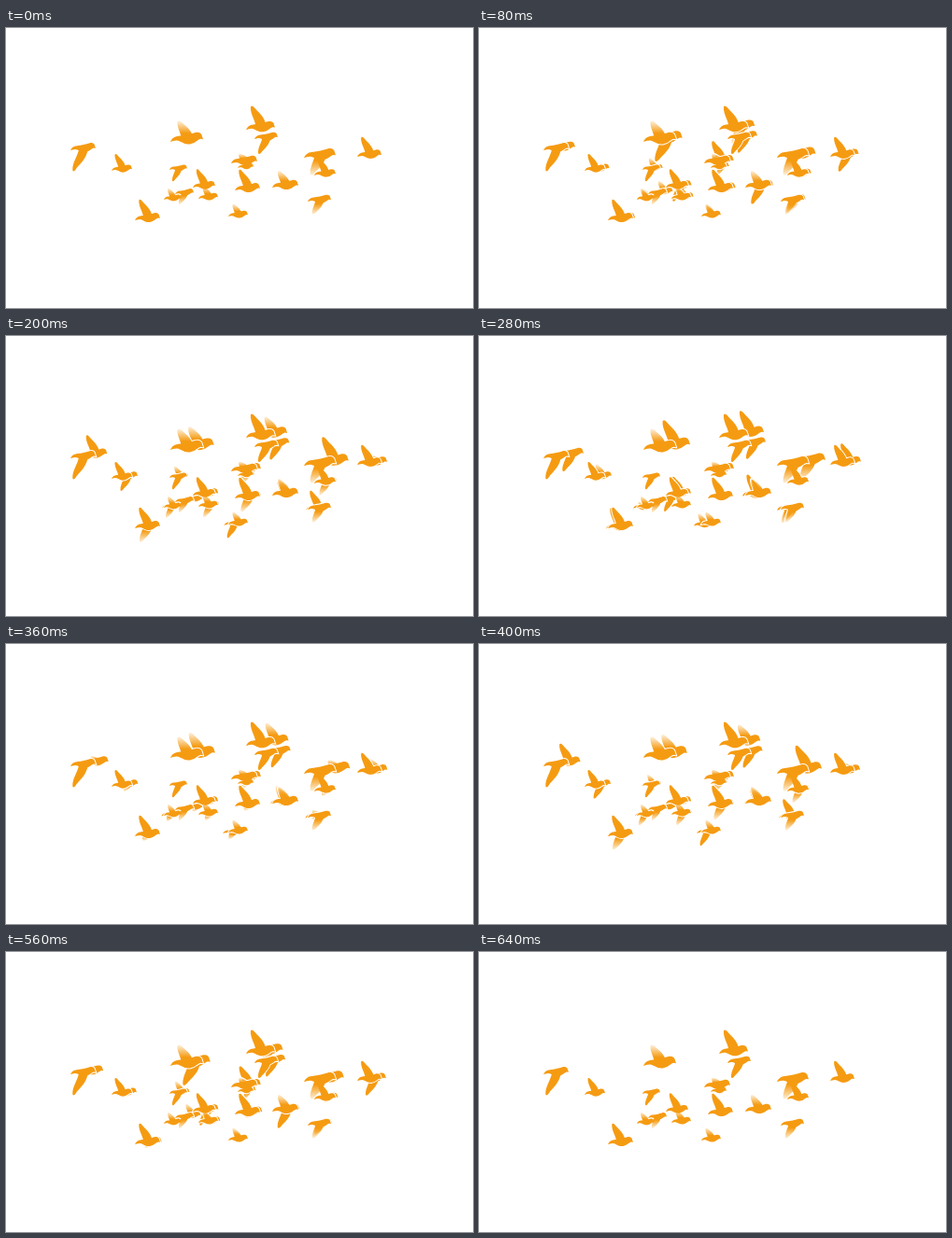
These frames come from a looping animation (500 px wide and 300 px high, 0.68 s). An HTML page:

```html
<!DOCTYPE html>
<html lang="en">
<head>
<meta charset="utf-8">
<title>Flock</title>
<style>
  html, body { margin: 0; width: 100%; height: 100%; overflow: hidden; background: #fff; }
  svg { display: block; width: 100vw; height: 100vh; }
</style>
</head>
<body>
<svg viewBox="0 0 500 300">
  <defs>
    <linearGradient id="fadeUp" x1="0" y1="1" x2="0" y2="0">
      <stop offset=".3" stop-color="#f59b12"/>
      <stop offset="1" stop-color="#f59b12" stop-opacity=".15"/>
    </linearGradient>
    <linearGradient id="fadeDown" x1="0" y1="0" x2="0" y2="1">
      <stop offset=".3" stop-color="#f59b12"/>
      <stop offset="1" stop-color="#f59b12" stop-opacity=".15"/>
    </linearGradient>
  </defs>
  <g id="moving"></g>
  <g id="halos"></g>
  <g id="resting"></g>
</svg>
<script>
const COLOR = '#f59b12';
const STEP = 40, HOLD = 80, LOOP = 680;
const PEAK = 6, LAST = 14;

// Tail x, tail y, length, furthest drift, wing poses (resting, then one per pose time).
const FLOCK = [
  [69, 131, 27, 16, 'LnuUD'],
  [113, 153, 22, 7, 'UnDDu'],
  [176, 122, 35, 15, 'uDDuU'],
  [257, 109, 31, 17, 'UduuU'],
  [266, 119, 25, 16, 'DDDDD'],
  [241, 145, 28, 4, 'vUudn'],
  [248, 150, 17, 0, 'nddvn'],
  [175, 152, 19, 0, 'DuUuD'],
  [169, 184, 19, -4, 'uuddv'],
  [181, 178, 20, 14, 'duUnD'],
  [200, 171, 24, 3, 'UDDnU'],
  [206, 183, 21, 0, 'uuddv'],
  [138, 206, 27, -2, 'UnDdU'],
  [245, 174, 27, 0, 'UnDdU'],
  [285, 171, 28, -3, 'uDDuU'],
  [238, 202, 21, -8, 'uunDu'],
  [319, 139, 34, 18, 'dnuUd'],
  [330, 158, 23, 0, 'UnDdu'],
  [323, 186, 25, -4, 'ddnUd'],
  [376, 138, 26, 7, 'UDDvU']
];
const LIFT = { U: 1, u: .78, v: .45, n: 0, d: -.85, D: -1, L: -1.3 };
const POSE_TIMES = [1, 2.9, 4, 6];

const BODY = 'M0 0C.04-.1.12-.17.25-.18C.45-.2.6-.24.74-.28' +
  'C.87-.32.96-.27.97-.17L1-.08L.92-.09C.82-.06.77.04.6.07C.42.1.32-.03.2-.04C.1-.04.06-.01 0 0Z';

function wingPath(lift) {
  const tipX = .45 - .25 * Math.abs(lift);
  const tipY = lift > 0 ? -.83 * lift : -.65 * lift;
  const point = (x, f) => `${x.toFixed(3)} ${(-.1 + (tipY + .1) * f).toFixed(3)} `;
  return 'M' + point(.34, 0) +
    'C' + point(.33, .3) + point(tipX - .06, .6) + point(tipX - .04, .95) +
    'Q' + point(tipX, 1.04) + point(tipX + .08, .92) +
    'C' + point(tipX + .2, .7) + point(.66, .5) + point(.7, 0) + 'Z';
}

function add(parent, name, attrs = {}) {
  const node = document.createElementNS('http://www.w3.org/2000/svg', name);
  for (const key in attrs) node.setAttribute(key, attrs[key]);
  return parent.appendChild(node);
}

function makeBird(parent) {
  const group = add(parent, 'g');
  const wing = add(group, 'path');
  add(group, 'path', { d: BODY, fill: COLOR });
  return { group, wing };
}

function poseBird({ group, wing }, x, y, size, lift) {
  group.setAttribute('transform', `translate(${x} ${y}) scale(${size})`);
  wing.setAttribute('d', wingPath(lift));
  const fade = lift > 0 ? 'url(#fadeUp)' : 'url(#fadeDown)';
  wing.setAttribute('fill', Math.abs(lift) < .9 ? fade : COLOR);
}

function liftAt(poses, p) {
  let i = 0;
  while (i < POSE_TIMES.length - 2 && p > POSE_TIMES[i + 1]) i++;
  const f = (p - POSE_TIMES[i]) / (POSE_TIMES[i + 1] - POSE_TIMES[i]);
  const from = LIFT[poses[i + 1]], to = LIFT[poses[i + 2]];
  return from + (to - from) * f * f * (3 - 2 * f);
}

const [moving, halos, resting] = ['moving', 'halos', 'resting']
  .map(id => document.getElementById(id));

const birds = FLOCK.map(([x, y, size, drift, poses]) => {
  const lift = LIFT[poses[0]];
  poseBird(makeBird(resting), x, y, size, lift);
  add(halos, 'path', {
    d: BODY + wingPath(lift), fill: 'none', stroke: '#fff', 'stroke-width': 2 / size,
    transform: `translate(${x} ${y}) scale(${size})`
  });
  return { x, y, size, drift, poses, parts: makeBird(moving) };
});

function render(time) {
  const t = time % LOOP;
  const step = t < HOLD ? 0 : Math.floor((t - HOLD) / STEP) + 1;
  const away = step > 0 && step <= LAST;
  moving.setAttribute('visibility', away ? 'visible' : 'hidden');
  halos.setAttribute('visibility', away ? 'visible' : 'hidden');
  if (!away) return;

  // Out quickly, back more slowly.
  const p = step <= PEAK ? step : PEAK - (step - PEAK) * (PEAK - 1) / (LAST - PEAK);
  for (const { x, y, size, drift, poses, parts } of birds) {
    const start = 2.7 + .27 * drift;
    const dx = start + (drift - start) * (p - 1) / (PEAK - 1);
    poseBird(parts, x + dx, y - .2 * dx, size, liftAt(poses, p));
  }
}

const begun = performance.now();
function tick() {
  render(performance.now() - begun);
  requestAnimationFrame(tick);
}
tick();
</script>
</body>
</html>
```
